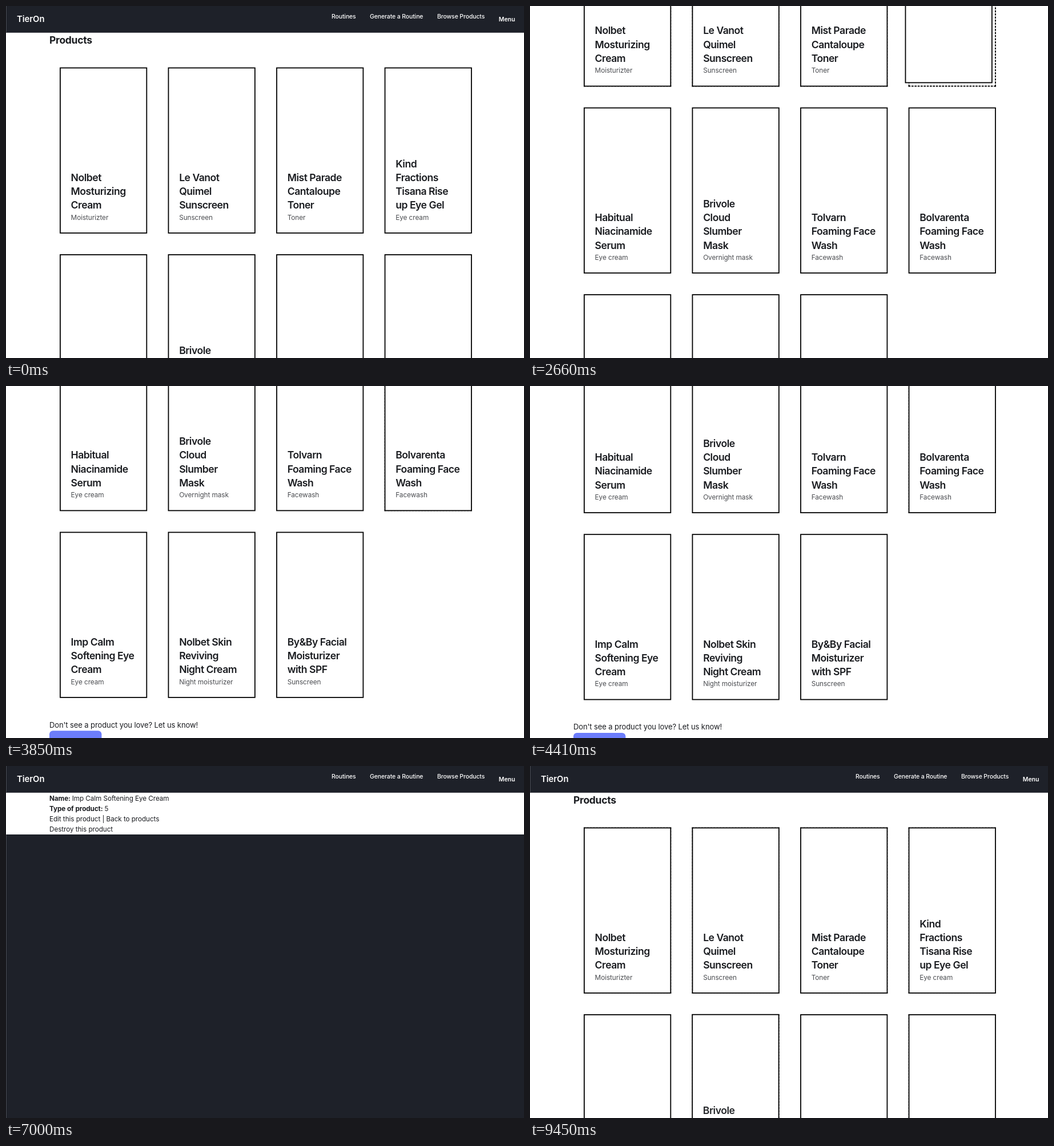
Write an HTML page with a canvas that moves like this. It is 907 by 617 pixels and loops after 9.94 s.

```html
<!DOCTYPE html>
<html lang="en">
<head>
<meta charset="utf-8">
<title>Products</title>
<style>
  html, body { margin: 0; width: 100%; height: 100%; overflow: hidden; background: #fff; }
  canvas { display: block; }
</style>
</head>
<body>
<canvas id="stage" width="907" height="617"></canvas>
<script>
const ctx = document.getElementById('stage').getContext('2d');
const W = 907, H = 617, LOOP = 9940, STEP = 70;
const DARK = '#1e2129', INK = '#1a1c20', EDGE = '#484b52';
const CARD_W = 153.2, CARD_H = 291.2, BORDER = 1.8, LIFT = 6.1, FADE = 200;

const products = [
  ['Nolbet|Mosturizing|Cream', 'Moisturizter'],
  ['Le Vanot|Quimel|Sunscreen', 'Sunscreen'],
  ['Mist Parade|Cantaloupe|Toner', 'Toner'],
  ['Kind|Fractions|Tisana Rise|up Eye Gel', 'Eye cream'],
  ['Habitual|Niacinamide|Serum', 'Eye cream'],
  ['Brivole|Cloud|Slumber|Mask', 'Overnight mask'],
  ['Tolvarn|Foaming Face|Wash', 'Facewash'],
  ['Bolvarenta|Foaming Face|Wash', 'Facewash'],
  ['Imp Calm|Softening Eye|Cream', 'Eye cream'],
  ['Nolbet Skin|Reviving|Night Cream', 'Night moisturizer'],
  ['By&By Facial|Moisturizer|with SPF', 'Sunscreen'],
].map(([title, type]) => ({ lines: title.split('|'), type }));

// [card, pointer enters, pointer leaves]
const hovers = [
  [0, 160, 575], [1, 590, 1060], [2, 1092, 1300], [3, 1345, 2830], [7, 2830, 3240],
  [10, 4710, 4835], [9, 4850, 5000], [8, 5335, 6720],
  [0, 8930, 8965], [1, 9115, 9175], [5, 9195, 9320],
];

// [time, scroll offset]
const scrollKeys = [
  [2240, 0], [2380, 30], [2520, 140], [2660, 257.4], [2800, 305], [2940, 322], [3010, 325],
  [3080, 325], [3150, 333], [3290, 405], [3430, 490], [3570, 515], [3710, 512],
  [3850, 507], [3990, 505.4], [4130, 504.3], [4410, 503.3],
];

const clamp = x => Math.min(1, Math.max(0, x));

// CSS "ease": cubic-bezier(.25, .1, .25, 1)
function ease(x) {
  x = clamp(x);
  let lo = 0, hi = 1;
  for (let i = 0; i < 20; i++) {
    const s = (lo + hi) / 2;
    if (0.75 * s * (1 - s) + s ** 3 < x) lo = s; else hi = s;
  }
  return 0.3 * lo * (1 - lo) ** 2 + 3 * lo * lo * (1 - lo) + lo ** 3;
}

function hoverAmount(card, t) {
  let amount = 0;
  for (const [id, enter, leave] of hovers) {
    if (id !== card || t < enter) continue;
    const peak = ease((Math.min(t, leave) - enter) / FADE);
    amount = t < leave ? peak : peak * (1 - ease((t - leave) / (FADE * peak)));
  }
  return amount;
}

function scrollAt(t) {
  if (t >= 6720) return 0;
  let [t0, y0] = scrollKeys[0];
  for (const [t1, y1] of scrollKeys) {
    if (t < t1) return t1 > t0 ? y0 + (y1 - y0) * clamp((t - t0) / (t1 - t0)) : y0;
    [t0, y0] = [t1, y1];
  }
  return y0;
}

function text(str, x, y, size, weight, color, spacing = 0) {
  ctx.font = `${weight} ${size}px Inter, Roboto, sans-serif`;
  ctx.letterSpacing = spacing + 'px';
  ctx.fillStyle = color;
  ctx.fillText(str, x, y);
  return x + ctx.measureText(str).width;
}

function rect(x, y, w, h, color) {
  ctx.fillStyle = color;
  ctx.fillRect(x, y, w, h);
}

// Dashes start and end on the corners, as in a CSS dashed border
function dashedLine(x1, y1, x2, y2) {
  const length = Math.hypot(x2 - x1, y2 - y1), dash = 2 * BORDER;
  const count = Math.round((length + BORDER) / (dash + BORDER));
  ctx.setLineDash([dash, (length - count * dash) / (count - 1)]);
  ctx.beginPath();
  ctx.moveTo(x1, y1);
  ctx.lineTo(x2, y2);
  ctx.stroke();
  ctx.setLineDash([]);
}

function dashedBox(x, y, w, h) {
  const b = BORDER / 2;
  for (const row of [y + b, y + h - b]) dashedLine(x, row, x + w, row);
  for (const col of [x + b, x + w - b]) dashedLine(col, y, col, y + h);
}

function drawNav(t) {
  rect(0, 0, W, 46.8, DARK);
  rect(0, 0, 1, 46.8, EDGE);
  // Brand and menu fade in after each page load
  const start = t >= 8540 ? 8630 : t >= 6720 ? 6760 : -FADE;
  ctx.globalAlpha = 0.35 + 0.65 * ease((t - start) / FADE);
  text('TierOn', 19, 28.2, 14.8, 600, '#fff', -0.05);
  text('Menu', 862.8, 26.8, 10.5, 600, '#fff', -0.05);
  ctx.globalAlpha = 1;
  [['Routines', 570], ['Generate a Routine', 637], ['Browse Products', 755]]
    .forEach(([label, x]) => text(label, x, 22.2, 10.5, 500, '#fff', -0.13));
}

function drawCard(i, t) {
  const { lines, type } = products[i];
  const x = 94 + (i % 4) * 189.55, y = 107.6 + Math.floor(i / 4) * 327.5;
  const lift = hoverAmount(i, t);
  ctx.strokeStyle = '#000';
  ctx.lineWidth = BORDER;
  if (lift > 0) dashedBox(x, y, CARD_W, CARD_H);
  ctx.save();
  ctx.translate(-LIFT * lift, -LIFT * lift);
  rect(x, y, CARD_W, CARD_H, '#fff');
  ctx.strokeRect(x + BORDER / 2, y + BORDER / 2, CARD_W - BORDER, CARD_H - BORDER);
  ctx.globalAlpha = clamp(1 - lift);
  lines.forEach((line, n) =>
    text(line, x + 19.6, y + 247.8 - (lines.length - 1 - n) * 24.3, 17.6, 600, INK, -0.5));
  text(type, x + 19.6, y + 267, 11.8, 400, '#4b4d51', -0.08);
  ctx.restore();
}

function drawProducts(t) {
  ctx.save();
  ctx.translate(0, -scrollAt(t));
  drawNav(t);
  text('Products', 76, 66, 17.5, 700, INK, -0.3);
  products.forEach((_, i) => drawCard(i, t));
  text("Don't see a product you love? Let us know!", 76, 1105.6, 13, 400, INK, -0.1);
  ctx.fillStyle = '#6c7dfb';
  ctx.beginPath();
  ctx.roundRect(76, 1111.3, 91.4, 36, 6);
  ctx.fill();
  ctx.restore();
}

function drawDetails(t) {
  drawNav(t);
  rect(0, 120, W, H - 120, DARK);
  rect(0, 120, 1, H - 120, EDGE);
  const row = (n, str, x = 76, weight = 400) =>
    text(str, x, 60.8 + n * 18.2, 11.7, weight, INK, -0.05);
  row(0, products[8].lines.join(' '), row(0, 'Name: ', 76, 700));
  row(1, '5', row(1, 'Type of product: ', 76, 700));
  row(2, 'Edit this product | Back to products');
  row(3, 'Destroy this product');
}

function frame(now) {
  const t = Math.floor((now % LOOP) / STEP) * STEP;
  rect(0, 0, W, H, '#fff');
  if (t >= 6720 && t < 8540) drawDetails(t);
  else drawProducts(t);
  requestAnimationFrame(frame);
}
requestAnimationFrame(frame);
</script>
</body>
</html>
```
